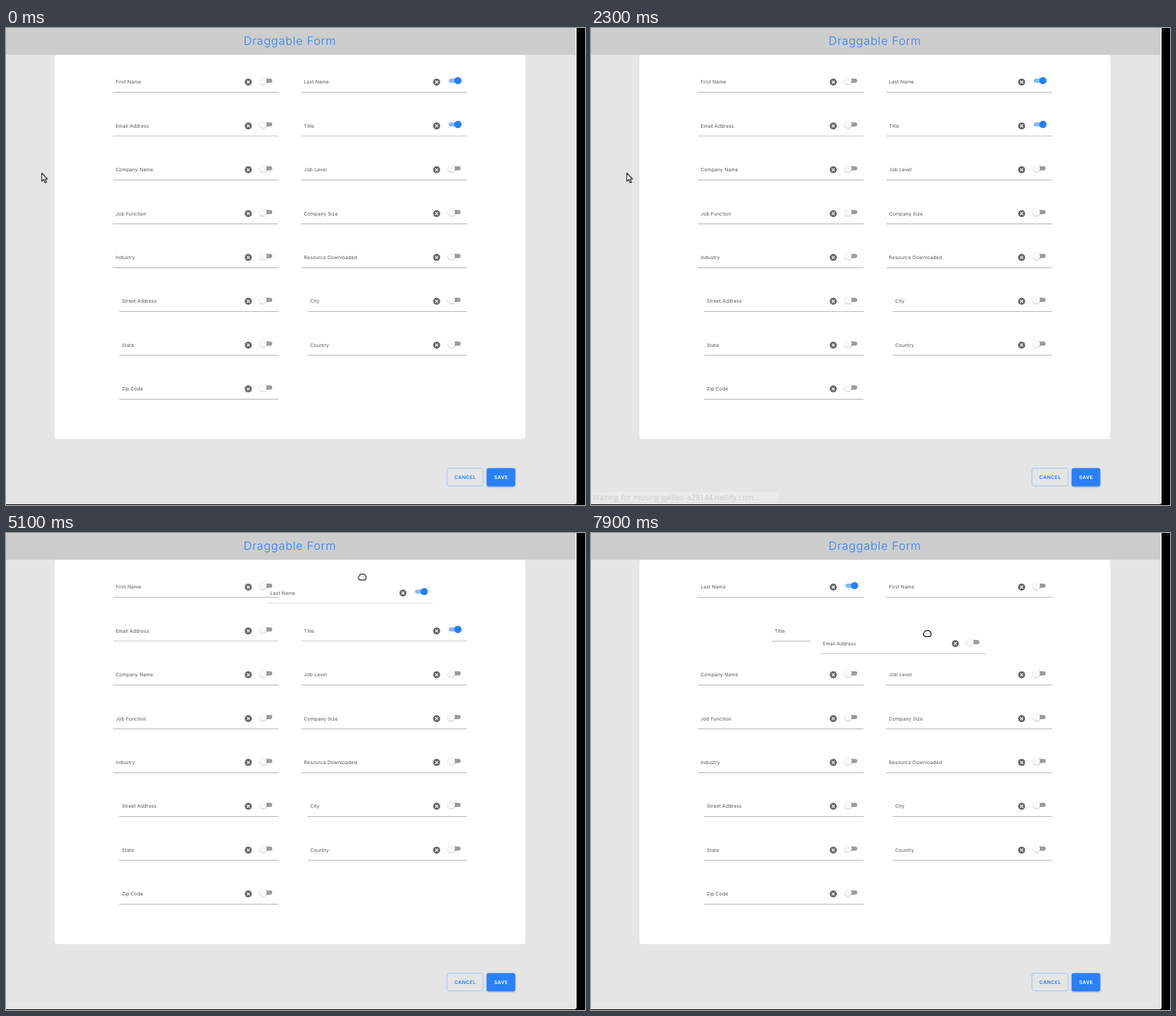
Animation, 825 px wide and 679 px high, one loop 8000 ms. Source, as an HTML page:

```html
<!DOCTYPE html>
<html lang="en">
<head>
<meta charset="utf-8">
<title>Draggable Form</title>
<style>
html, body { margin: 0; width: 100%; height: 100%; overflow: hidden; background: #000; }
svg { display: block; width: 825px; height: 679px; }
text { font-family: Inter, Roboto, sans-serif; text-rendering: geometricPrecision; }
.heading { font-size: 16.4px; font-weight: 300; letter-spacing: .7px; fill: #2a80f6; }
.label { font-size: 6.9px; letter-spacing: .1px; fill: #555; }
.line { stroke: #949494; stroke-width: .75; }
.btn { font-size: 7px; font-weight: 600; letter-spacing: .36px; text-anchor: middle; }
.status { font-family: "Open Sans", "Noto Sans", sans-serif; font-size: 10.8px; fill: #777; }

.anim, .anim .line { animation-duration: 8s; animation-timing-function: step-end; animation-iteration-count: infinite; }

/* page reload */
#app { animation-name: app; }
#fields { animation-name: fields; }
#card { animation-name: card; }
#buttons { animation-name: buttons; }
#status { animation-name: status; }
@keyframes app { 0%, 21.25% { opacity: 1 } 20% { opacity: 0 } }
@keyframes fields { 0%, 26.25% { opacity: 1 } 20% { opacity: 0 } }
@keyframes card { 0%, 26.25% { height: 547px } 20% { height: 32px } }
@keyframes buttons { 0%, 26.25% { transform: none } 20% { transform: translateY(-515px) } }
@keyframes status {
  0%, 30% { opacity: 0 }
  16.25% { opacity: 1 }
  26.25% { opacity: .75 }
  27.5% { opacity: .5 }
  28.75% { opacity: .25 }
}

/* fields */
#first-name { animation-name: first; }
#last-name { animation-name: last; }
#email-address { animation-name: email; }
#title { animation-name: title; }
#squeezed { animation-name: squeezed; }
#last-name .line { animation-name: last-line; }
#email-address .line { animation-name: email-line; }
#city .line { animation-name: city-line; }
@keyframes first { 0% { transform: none } 67.5%, 100% { transform: translateX(268.4px) } }
@keyframes last {
  0% { transform: none }
  63.75% { transform: translate(-48px, 8.5px) }
  67.5% { transform: translate(-145px, 6px) }
  70% { transform: translate(-264px, 3px) }
  73.75% { transform: translate(-278.4px, -2px) }
  76.25% { transform: translate(-272px, -1px) }
  78.75%, 100% { transform: translate(-268.4px, 0) }
}
@keyframes email {
  0% { transform: none }
  95% { transform: translate(10px, 1px) }
  96.25% { transform: translate(50px, 2px) }
  98.75%, 100% { transform: translate(174px, 18px) }
}
@keyframes title { 0% { opacity: 1 } 98.75%, 100% { opacity: 0 } }
@keyframes squeezed { 0% { opacity: 0 } 98.75%, 100% { opacity: 1 } }
@keyframes last-line {
  0%, 78.75% { stroke: #949494; stroke-width: .75 }
  52.5% { stroke: #333; stroke-width: 1.5 }
  63.75% { stroke: #c0c0c0; stroke-width: .75 }
}
@keyframes email-line {
  0%, 86.25%, 95% { stroke: #949494; stroke-width: .75 }
  83.75%, 90% { stroke: #333; stroke-width: 1.5 }
}
@keyframes city-line {
  0%, 50% { stroke: #949494; stroke-width: .75 }
  45% { stroke: #333; stroke-width: 1.5 }
}

/* pointer */
#pointer { animation-name: pointer; }
#arrow { animation-name: arrow; }
#beam { animation-name: beam; }
#open { animation-name: open; }
#closed { animation-name: closed; }
@keyframes pointer {
  0% { transform: translate(50.5px, 206px) }
  40% { transform: translate(90px, 216px) }
  41.25% { transform: translate(180px, 250px) }
  42.5% { transform: translate(300px, 305px) }
  43.75% { transform: translate(420px, 355px) }
  45% { transform: translate(500px, 380px) }
  46.25% { transform: translate(430px, 240px) }
  47.5% { transform: translate(279px, 57px) }
  50% { transform: translate(402.5px, 74.5px) }
  52.5% { transform: translate(490px, 56px) }
  53.75% { transform: translate(553px, 53px) }
  56.25% { transform: translate(555.5px, 54px) }
  63.75% { transform: translate(507.5px, 62.5px) }
  67.5% { transform: translate(410.5px, 60px) }
  70% { transform: translate(291.5px, 57px) }
  73.75% { transform: translate(277px, 52px) }
  76.25% { transform: translate(283px, 54px) }
  78.75% { transform: translate(290px, 78px) }
  81.25% { transform: translate(298px, 156px) }
  83.75% { transform: translate(350px, 166px) }
  85% { transform: translate(450px, 167px) }
  86.25% { transform: translate(557px, 160px) }
  87.5% { transform: translate(365px, 139px) }
  90% { transform: translate(312px, 128px) }
  92.5% { transform: translate(305px, 125px) }
  95% { transform: translate(315px, 126px) }
  96.25% { transform: translate(355px, 127px) }
  98.75%, 100% { transform: translate(479px, 143px) }
}
@keyframes arrow { 0%, 81.25% { opacity: 1 } 50%, 90%, 100% { opacity: 0 } }
@keyframes beam { 0%, 52.5%, 100% { opacity: 0 } 50% { opacity: 1 } }
@keyframes open { 0%, 57.5%, 81.25%, 92.5%, 100% { opacity: 0 } 52.5%, 78.75%, 90% { opacity: 1 } }
@keyframes closed { 0%, 78.75% { opacity: 0 } 57.5%, 92.5%, 100% { opacity: 1 } }
</style>
</head>
<body>
<svg viewBox="0 0 825 679" xmlns="http://www.w3.org/2000/svg">
  <defs>
    <filter id="soft" x="-50%" y="-50%" width="200%" height="200%">
      <feDropShadow dx="0" dy=".8" stdDeviation=".8" flood-opacity=".3"/>
    </filter>
    <g id="remove">
      <circle r="5" fill="#666"/>
      <path d="M-2 -2L2 2M2 -2L-2 2" stroke="#fff" stroke-width="1.1"/>
    </g>
    <g id="off">
      <rect x="-8.5" y="-3" width="17" height="6" rx="3" fill="#9b9b9b"/>
      <circle cx="-4.5" r="5" fill="#fafafa" filter="url(#soft)"/>
    </g>
    <g id="on">
      <rect x="-8.5" y="-3" width="17" height="6" rx="3" fill="#8abafa"/>
      <circle cx="4.6" r="5.2" fill="#2680f9"/>
    </g>
  </defs>

  <path d="M0 0H813V675Q813 678 810 678H0Z" fill="#e5e5e5"/>

  <g id="app" class="anim">
    <rect width="811" height="38" fill="#cdcdcd"/>
    <text class="heading" x="338.5" y="24.3">Draggable Form</text>
    <rect id="card" class="anim" x="69" y="38.3" width="671" height="547" rx="4" fill="#fff"/>
    <g id="fields" class="anim"></g>
    <g id="buttons" class="anim">
      <rect x="628.2" y="626.6" width="51.6" height="25.2" rx="3" fill="none" stroke="#92bdf2" stroke-width=".8"/>
      <text class="btn" x="654.3" y="641.5" fill="#2a80f6">CANCEL</text>
      <rect x="684.8" y="626.4" width="40.8" height="26" rx="3" fill="#2a80fa" filter="url(#soft)"/>
      <text class="btn" x="705.4" y="641.5" fill="#fff">SAVE</text>
    </g>
  </g>

  <g id="status" class="anim">
    <path d="M0 660H264.5Q267.5 660 267.5 663V676H0Z" fill="#fff" stroke="#d2d2d2" stroke-width=".8"/>
    <text class="status" x="2" y="671.8">Waiting for musing-galileo-a29144.netlify.com…</text>
  </g>

  <g id="pointer" class="anim" fill="#fff" stroke="#111" stroke-linejoin="round">
    <path id="arrow" class="anim" d="M.5 .5V12.2L3.2 9.7L5.2 14.3L7.2 13.4L5.2 9H8.6Z" stroke-width="1.1"/>
    <g id="beam" class="anim" fill="none">
      <path d="M-3 -6H3M-3 6H3M0 -6V6" stroke-width="2.8"/>
      <path d="M0 -5V5" stroke="#fff" stroke-width=".8"/>
    </g>
    <path id="open" class="anim" d="M-4 7L-7 1Q-6 -1 -4 1V-5Q-3 -6.5 -2 -5V-6.5Q-.5 -8 .5 -6.5V-6Q2 -7 3 -5V-4Q5 -5 5.5 -3V3L4 7Z" stroke-width="1.1"/>
    <g id="closed" class="anim">
      <path d="M-3.5 4.3Q-5.6 2.8 -5.6 .8Q-5.6 -.9 -3.9 -1Q-4 -3.6 -2 -3.6Q-.8 -4.7 .5 -3.9Q1.8 -4.5 2.8 -3.4Q4.4 -3.5 4.6 -1.6Q5.7 -1 5.6 .8Q5.4 3 4.4 4.3Z" stroke-width="1.2"/>
      <path d="M-2 -.2v.8M.5 -.2v.8M2.8 -.2v.8" stroke-width=".7"/>
    </g>
  </g>
</svg>
<script>
const labels = [
  "First Name", "Last Name", "Email Address", "Title", "Company Name", "Job Level",
  "Job Function", "Company Size", "Industry", "Resource Downloaded",
  "Street Address", "City", "State", "Country", "Zip Code"
];
const enabled = ["Last Name", "Title"];
const dragged = ["Last Name", "Email Address"];

function field(label, i) {
  const row = i >> 1;
  const x = 152.4 + (i % 2) * 268.4;
  const y = 92 + row * 62.4;
  const indent = row > 4 ? 8.8 : 0;
  const id = label.toLowerCase().replace(" ", "-");
  const state = enabled.includes(label) ? "on" : "off";
  return `<g transform="translate(${x} ${y})"><g id="${id}" class="anim">
    <text class="label" x="${3.8 + indent}" y="-12.6">${label}</text>
    <use href="#remove" x="192.8" y="-15"/>
    <use href="#${state}" x="218.5" y="-17.1"/>
    <path class="line" d="M${indent} -.4H236"/>
  </g></g>`;
}

const items = labels.map(field);
const isDragged = (_, i) => dragged.includes(labels[i]);
const squeezed = `<g id="squeezed" class="anim">
  <text class="label" x="261.7" y="141.8">Title</text>
  <path class="line" d="M258 154H313"/>
</g>`;

document.getElementById("fields").innerHTML =
  items.filter((s, i) => !isDragged(s, i)).join("") + squeezed + items.filter(isDragged).join("");
</script>
</body>
</html>
```
